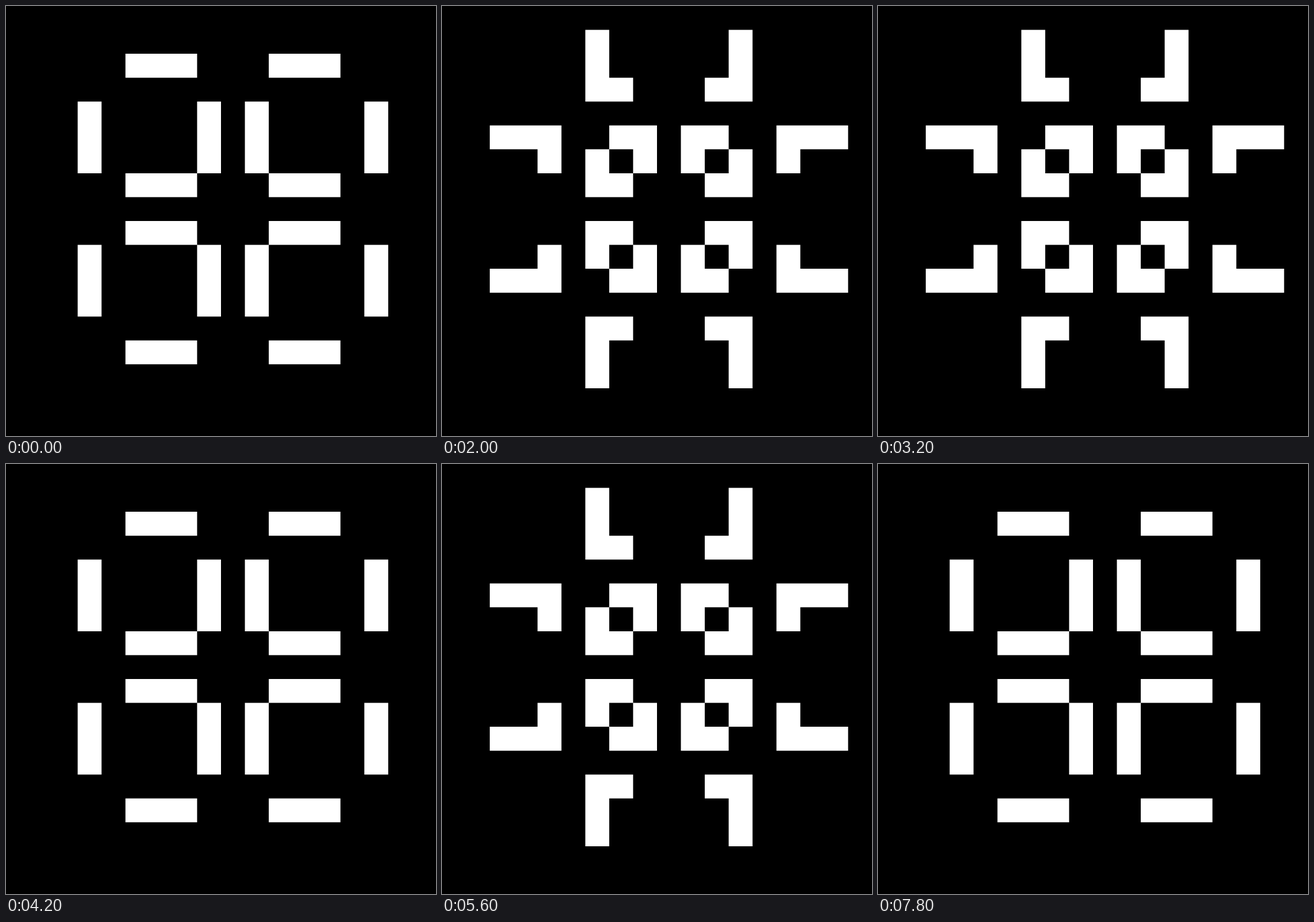
An HTML page with a canvas that plays this animation: 748 px wide and 748 px high, repeating every 8 s.

```html
<!DOCTYPE html>
<html lang="en">
<head>
<meta charset="utf-8">
<title>Pulsar</title>
<style>
  html, body { margin: 0; width: 100%; height: 100%; overflow: hidden; background: #000; }
  canvas { display: block; width: 748px; height: 748px; }
</style>
</head>
<body>
<canvas width="748" height="748"></canvas>
<script>
// Conway's Game of Life: the pulsar, an oscillator of period 3.
const STAGE = 748, GRID = 18, CELL = STAGE / GRID;
const CENTER_X = 9, CENTER_Y = 8;
const STEP_MS = 200, LOOP_MS = 8000;
const ctx = document.querySelector('canvas').getContext('2d');

const makeGrid = isAlive => Array.from({ length: GRID }, (_, y) =>
  Array.from({ length: GRID }, (_, x) => isAlive(x, y)));

const isBar = (across, along) =>
  (across === 1 || across === 6) && along >= 2 && along <= 4;

const pulsar = makeGrid((x, y) => {
  const dx = Math.abs(x - CENTER_X), dy = Math.abs(y - CENTER_Y);
  return isBar(dx, dy) || isBar(dy, dx);
});

function evolve(grid) {
  return makeGrid((x, y) => {
    let neighbours = 0;
    for (let dy = -1; dy <= 1; dy++)
      for (let dx = -1; dx <= 1; dx++)
        if ((dx || dy) && grid[y + dy]?.[x + dx]) neighbours++;
    return neighbours === 3 || (neighbours === 2 && grid[y][x]);
  });
}

// One path per generation, so adjoining cells fill without seams.
function toPath(grid) {
  const path = new Path2D();
  grid.forEach((row, y) => row.forEach((alive, x) => {
    if (alive) path.rect(x * CELL, y * CELL, CELL, CELL);
  }));
  return path;
}

const second = evolve(pulsar);
const phases = [pulsar, second, evolve(second)].map(toPath);
const start = performance.now();

function draw() {
  const time = (performance.now() - start) % LOOP_MS;
  const generation = Math.floor(time / STEP_MS);
  ctx.fillStyle = '#000';
  ctx.fillRect(0, 0, STAGE, STAGE);
  ctx.fillStyle = '#fff';
  ctx.fill(phases[generation % phases.length]);
  requestAnimationFrame(draw);
}
draw();
</script>
</body>
</html>
```
